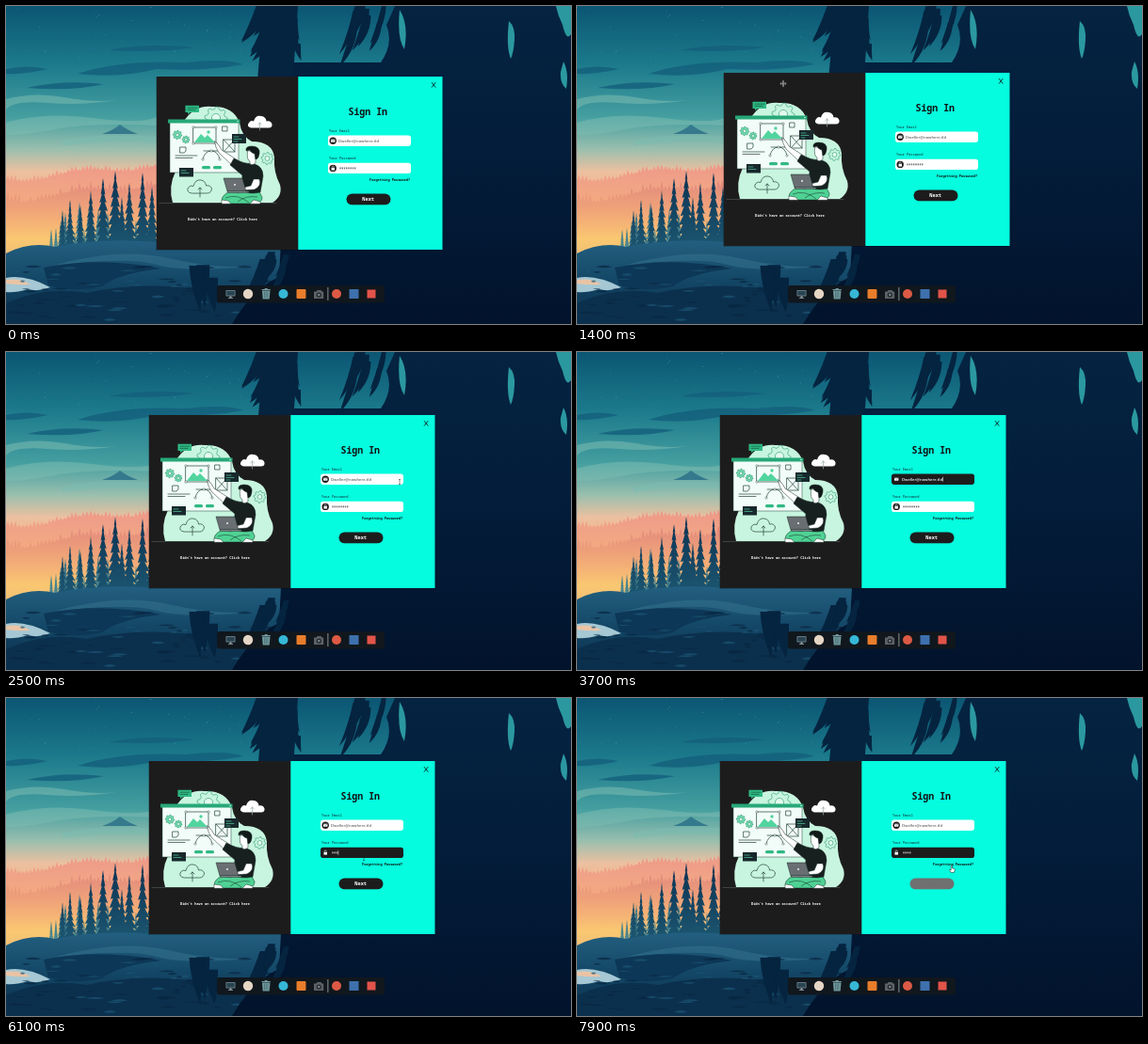
These frames come from a looping animation (600x338 px, 8 s). An HTML page:

```html
<!DOCTYPE html>
<html lang="en">
<head>
<meta charset="utf-8">
<title>Sign In</title>
<style>
html, body { margin: 0; width: 100%; height: 100%; overflow: hidden; background: #031a36; }
svg { display: block; width: 100vw; height: 100vh; }
text { font-family: "Noto Sans Mono", "DejaVu Sans Mono", monospace; font-weight: 600; white-space: pre; }
.plain { font-family: "Open Sans", sans-serif; }
.label { font-weight: 500; }
.line { fill: none; stroke: #24443c; stroke-width: .7; stroke-linecap: round; stroke-linejoin: round; }
.cursor > g { opacity: 0; }
</style>
</head>
<body>
<svg viewBox="0 0 600 338" preserveAspectRatio="none">
  <defs>
    <linearGradient id="sky" x2="0" y2="1">
      <stop offset="0" stop-color="#0b5673"/>
      <stop offset=".18" stop-color="#1b798b"/>
      <stop offset=".35" stop-color="#459fa0"/>
      <stop offset=".45" stop-color="#9abfae"/>
      <stop offset=".52" stop-color="#ecc0a0"/>
      <stop offset=".63" stop-color="#f7b07c"/>
      <stop offset=".73" stop-color="#fbd070"/>
      <stop offset=".8" stop-color="#eab578"/>
    </linearGradient>
    <linearGradient id="ridge" x2="0" y2="1">
      <stop stop-color="#ee9286"/><stop offset="1" stop-color="#f9ae75" stop-opacity="0"/>
    </linearGradient>
    <linearGradient id="near" x2="0" y2="1">
      <stop stop-color="#dd7d7c"/><stop offset="1" stop-color="#fbc56f" stop-opacity="0"/>
    </linearGradient>
    <linearGradient id="mist" gradientUnits="userSpaceOnUse" x1="0" y1="190" x2="0" y2="258">
      <stop stop-color="#2c6179"/><stop offset="1" stop-color="#4d8890"/>
    </linearGradient>
    <linearGradient id="pine" gradientUnits="userSpaceOnUse" x1="0" y1="180" x2="0" y2="262">
      <stop stop-color="#0d3453"/><stop offset="1" stop-color="#1d5873"/>
    </linearGradient>
    <linearGradient id="valley" x2="0" y2="1">
      <stop stop-color="#235f80"/><stop offset=".5" stop-color="#134665"/><stop offset="1" stop-color="#0a2d49"/>
    </linearGradient>
    <linearGradient id="night" x2="0" y2="1">
      <stop stop-color="#052442"/><stop offset=".5" stop-color="#031c39"/><stop offset="1" stop-color="#02132c"/>
    </linearGradient>
  </defs>

  <g id="scene">
    <path fill="url(#sky)" d="M0 0H600V338H0z"/>
    <g fill="#7cbcb2" opacity=".55">
      <path d="M0 99Q30 91 62 97T118 100Q80 106 44 103T0 110zM0 124Q40 112 92 119T160 118V127Q90 124 52 131T0 137z"/>
      <path d="M60 143Q100 134 160 139V146Q110 142 60 149z"/>
    </g>
    <g fill="#145f7c" opacity=".8">
      <path d="M0 67Q22 62 44 67Q20 73 0 72zM76 72Q120 57 190 60Q235 55 252 62Q210 70 160 67Q120 77 76 72z"/>
      <path d="M22 87Q60 78 104 83Q70 91 22 87zM110 47Q145 39 200 44Q160 50 110 47z"/>
    </g>
    <path fill="#35798d" d="M102 136Q114 132 121 126Q129 132 140 136z"/>
    <g id="stars" fill="#9ad5d5"></g>
    <g id="ridges"></g>
    <g id="forest"></g>
    <path fill="url(#valley)" d="M0 263Q25 250 52 256Q100 246 160 251H330V338H0z"/>
    <path fill="#37768f" opacity=".5" d="M50 276Q120 256 172 268T270 276Q190 284 160 275T50 276z"/>
    <path fill="#0d3756" d="M40 278Q100 266 165 279Q120 284 102 298Q70 305 45 297z"/>
    <path fill="#a5c8d4" d="M0 289Q20 285 47 299Q35 304 23 301Q10 305 0 304z"/>
    <path fill="#e9c3a5" d="M0 291Q15 289 26 296Q12 297 0 295z"/>
    <path fill="#0b304d" d="M0 316Q40 297 86 305Q150 290 232 305H330V338H0z"/>
    <g id="grass"></g>
    <path fill="url(#night)" d="M413 0H600V338H240Q262 300 290 288L302 60H398Q412 40 404 20z"/>
    <g id="boughs" fill="#052440"></g>
    <g fill="#2b98a0">
      <path d="M534 16Q541 22 540 36T536 56Q531 44 534 16zM584 0H600V30Q595 38 591 20Q586 10 584 0z"/>
      <path d="M592 59Q598 70 595 88Q588 82 589 70zM418 4Q428 20 423 46Q415 34 418 4z"/>
    </g>
  </g>

  <g id="dock">
    <rect x="224" y="297" width="178" height="18.500" rx="2.500" fill="#10171d"/>
    <rect x="233.500" y="302" width="10" height="6.500" rx=".7" fill="#6e8793"/>
    <path fill="#29434f" d="M234.300 302.800h8.400v4.800h-8.400z"/>
    <path fill="#a4adb2" d="M237.500 308.500h2v1.500h1.500v.8h-5v-.8h1.500z"/>
    <circle cx="257" cy="306" r="5.200" fill="#e5d5c4"/>
    <path fill="#739b9f" d="M272 302.500h8.500l-.8 9h-7zM271.500 301h9.300v1h-9.300zM274.700 300h3v1h-3z"/>
    <path class="line" style="stroke:#3f686e" d="M274.500 304v6M276.200 304v6M278 304v6"/>
    <circle cx="294.500" cy="306" r="5" fill="#36b7d6"/>
    <rect x="308.500" y="301" width="10" height="10" rx="1" fill="#e87d2b"/>
    <path fill="#5c6266" d="M327 303.500h2.500l1-1.500h4l1 1.500h1.700v7.500H327z"/>
    <circle cx="332.300" cy="307" r="2.600" fill="#20272b"/><circle cx="332.300" cy="307" r="1.300" fill="#75868e"/>
    <path fill="#a9b0b4" d="M341.500 299h.8v14h-.8z"/>
    <circle cx="351" cy="306" r="5" fill="#dc5a45"/>
    <rect x="364.500" y="301" width="10" height="10" fill="#3e70ad"/>
    <rect x="383.500" y="301.500" width="9" height="9" fill="#e2544a"/>
  </g>

  <g id="window">
    <path fill="#000" opacity=".2" d="M159 75H464V260H159z"/>
    <path fill="#1d1c1d" d="M160 75H310.500V259H160z"/>
    <path fill="#06fcde" d="M310.300 75H463.500V259H310.300z"/>

    <g id="art">
      <path fill="#c8f5df" d="M177 209Q172 192 180 176L188 124Q199 105 219 107Q241 106 248 124Q250 138 261 144Q283 144 285 161Q284 177 291 190Q294 202 283 209z"/>
      <g id="gears"></g>
      <rect x="174" y="123" width="73" height="54" fill="#f2fcf8" stroke="#24443c" stroke-width=".5"/>
      <rect x="172" y="120.500" width="76.500" height="4" fill="#27a878"/>
      <circle cx="246" cy="122.500" r=".8" fill="#c8f5df"/>
      <g id="panelGears"></g>
      <g class="line" stroke-width=".5">
        <path d="M199 129h24v17h-24zM231 142h12v13h-12zl12 13M243 142l-12 13M185 150h6v4l-2 2h-4zM230 128h5v5h-5z"/>
        <path d="M180 159h23M180 161.500h18M209 163Q211 154 218 154T227 163M210 154h16"/>
      </g>
      <path fill="#51d49e" d="M200 145l7-9 4 4 3-3 8 8z"/><circle cx="215" cy="134" r="1.700" fill="#51d49e"/>
      <path fill="#fff" stroke="#24443c" stroke-width=".4" d="M198 128h2v2h-2zM222 128h2v2h-2zM198 145h2v2h-2zM222 145h2v2h-2zM208 162h2v2h-2zM226 162h2v2h-2zM217 153h2v2h-2z"/>
      <rect x="208" y="170" width="9" height="3.200" rx="1.500" fill="#2fb983"/>
      <rect x="220" y="170" width="9" height="3.200" rx="1.500" fill="#2fb983"/>
      <path fill="#2fb983" d="M190.500 105.700h14.500v7.300h-9l-3 2v-2h-2.500z"/>
      <path class="line" style="stroke:#125840" d="M193 108.200h10M193 110.400h8"/>
      <path fill="#17282c" d="M240 136h15v10h-15zM184 172h15v9.500h-15z"/>
      <path class="line" style="stroke:#55cba0" d="M242 139h5M242 141.500h8M242 144h4M186 175h5M186 177.500h8"/>
      <path fill="#fff" d="M260 129.500Q255 128 258 124Q260 121 263 122.500Q265 115.500 271 117Q276 117.500 276.500 122.500Q281 121.500 282.500 125.500Q283 129.500 279 129.500z"/>
      <path class="line" style="stroke:#98a8a4" d="M269.500 132v-8M267.500 126l2-2 2 2"/>
      <path class="line" d="M197 199Q191 198 193.500 193Q196 190 199 191.500Q201 184 207 185Q212 186 212.500 191Q217 190 218.500 194Q218 199 214 199zM206 203v-10M204 195l2-2 2 2"/>
      <path class="line" style="stroke:#4a5552" d="M163 209.500h124"/>
      <g stroke="#152824" stroke-width=".5" stroke-linejoin="round">
        <path fill="#4fd294" d="M247 196Q268 190 272 203Q273 210 260 210H235Q227 209 230 203Q236 194 247 199z"/>
        <path fill="none" d="M233 204Q246 199 258 209M267 203Q255 201 246 208"/>
        <path fill="#fff" d="M229 206l7 1 3 3.300h-10zM263 206l7 2v2.300h-11z"/>
        <path fill="#fff" d="M246 164L229 153 226 148 221.500 143.500 223 150 226 156 242 171z"/>
        <path fill="#17201f" d="M242 162Q253 168 261 167.500Q273 169 273 181L270 198Q256 201 250 195L251 180 238 169z"/>
        <path fill="#fff" d="M269 184Q272 191 264 195L252 196 252 193 260 191 263 184z"/>
        <path fill="#fff" d="M256.500 154Q255.500 164 259 165V168Q262 170 265 167V161L266 154z"/>
        <path fill="#111918" d="M255 154Q254 149 261 149Q270 149 269 157Q268 163 265 163L264 157Q260 156 259 153Z"/>
        <path fill="#696e72" d="M231 183h20l4 14h-20z"/><path fill="#9a9fa2" d="M235 197h23v1.500h-22z"/>
      </g>
      <circle cx="243" cy="190" r="1" fill="#e8efed"/>
    </g>

    <g id="form" transform="translate(0 -.4)">
      <text x="193" y="228" font-size="3.640" fill="#fff">Didn't have an account? Click here</text>
      <path d="M452 81.500l4.300 5.500M456.300 81.500l-4.300 5.500" stroke="#111" stroke-width=".8"/>
      <text x="363.500" y="116.300" font-size="9.900" fill="#111">Sign In</text>
      <g fill="#123">
        <text class="label" x="343" y="134" font-size="3.650">Your Email</text>
        <text class="label" x="343" y="163.500" font-size="3.650">Your Password</text>
        <text x="386" y="186.500" font-size="3.600" fill="#111">Forgetting Password?</text>
      </g>
      <rect id="emailBox" x="342" y="138" width="88" height="11.300" rx="2.800" fill="#fff"/>
      <rect id="emailInput" x="353" y="141.300" width="73" height="4.700" fill="#1d1c1d" opacity="0"/>
      <circle cx="347.200" cy="143.600" r="3.700" fill="#1d1c1d"/>
      <path fill="#fff" d="M345 142.100h4.400v3H345z"/><path d="M345 142.300l2.200 1.500 2.200-1.500" fill="none" stroke="#1d1c1d" stroke-width=".4"/>
      <text id="email" class="plain" x="353" y="145.100" font-size="4.150" fill="#666">Dweller@nowhere.tld</text>
      <path id="emailCaret" fill="#fff" opacity="0" d="M396.300 141.200h.6v4.700h-.6z"/>
      <rect id="passBox" x="342" y="167.200" width="88" height="11.300" rx="2.800" fill="#fff"/>
      <circle cx="347.200" cy="172.800" r="3.700" fill="#1d1c1d"/>
      <path fill="#fff" d="M345.500 172.300h3.500v2.700h-3.500z"/><path d="M346.200 172.300v-1a1 1 0 0 1 2 0v1" fill="none" stroke="#fff" stroke-width=".5"/>
      <g id="dots" fill="#333"></g>
      <path id="passCaret" fill="#fff" opacity="0" d="M353.700 170.400h.6v4.800h-.6z"/>
      <rect id="button" x="361.500" y="199.800" width="47" height="12.200" rx="6.100" fill="#1d1c1d"/>
      <text id="next" x="378.300" y="207.900" font-size="5.300" fill="#fff">Next</text>
    </g>
  </g>

  <g class="cursor" id="cursor">
    <g id="arrow"><path d="M0 0v7l1.700-1.500 1.200 2.700 1.200-.5-1.200-2.600h2.300z" fill="#fff" stroke="#111" stroke-width=".5"/></g>
    <g id="move"><path d="M0-3.500l1.200 1.500h-2.400zM0 3.500l1.200-1.500h-2.400zM-3.500 0l1.500-1.200v2.400zM3.500 0l-1.500-1.200v2.400zM-.4-2h.8v1.600H2v.8H.4V2h-.8V.4H-2v-.8h1.600z" fill="#fff" stroke="#111" stroke-width=".2"/></g>
    <g id="beam"><path d="M-1-2.500h2M0-2.500v5M-1 2.500h2" stroke="#222" stroke-width=".5" fill="none"/></g>
    <g id="hand"><path d="M-.8-2.500q.7-.7 1.200 0V0l2.300.6q.8.4.5 1.500L2.400 4.500H-.6L-2.600 1.800q.2-.8 1-.4l.8.7z" fill="#fff" stroke="#111" stroke-width=".5"/></g>
  </g>
</svg>
<script>
const LOOP = 8000;
const DARK = '#1d1c1d';
const $ = id => document.getElementById(id);

let seed = 11;
const rand = (a = 0, b = 1) => {
  seed = (seed * 16807) % 2147483647;
  return a + (b - a) * seed / 2147483647;
};

function add(parent, tag, attrs) {
  const el = document.createElementNS('http://www.w3.org/2000/svg', tag);
  for (const key in attrs) el.setAttribute(key, attrs[key]);
  return $(parent).appendChild(el);
}

// Scenery
for (let i = 0; i < 45; i++) {
  add('stars', 'circle', { cx: rand(0, 250), cy: rand(0, 60), r: rand(.2, .5), opacity: rand(.3, .8) });
}

function ridge(fill, left, right, jag) {
  let d = 'M0 262';
  for (let x = 0; x <= 260; x += 4) {
    const y = left + (right - left) * Math.min(x / 160, 1) + 3 * Math.sin(x / 17);
    d += `L${x} ${y}L${x + 2} ${y - rand(2, jag)}`;
  }
  add('ridges', 'path', { d: d + 'L260 262z', fill });
}
ridge('url(#ridge)', 186, 170, 7);
ridge('url(#near)', 208, 190, 10);

function pine(x, base, height, fill) {
  const width = height * .13, tiers = 9;
  let left = '', right = '';
  for (let i = 1; i <= tiers; i++) {
    const y = base - height + height * i / tiers;
    const w = width * i / tiers * rand(.8, 1.2);
    right += `L${x + w} ${y}L${x + w * .45} ${y - 1}`;
    left = `L${x - w * .45} ${y - 1}L${x - w} ${y}` + left;
  }
  add('forest', 'path', { d: `M${x} ${base - height}${right}${left}z`, fill });
}
for (let x = 48; x < 166; x += 5) pine(x, 260, rand(20, 52), 'url(#mist)');
[[60, 217], [68, 206], [79, 212], [90, 196], [103, 183], [116, 175], [123, 203], [131, 188], [145, 177], [155, 192]]
  .forEach(([x, top]) => pine(x, 262, 262 - top, 'url(#pine)'));

for (let i = 0; i < 70; i++) {
  const x = rand(0, 280), y = rand(275, 335), length = rand(5, 22);
  add('grass', 'path', {
    d: `M${x} ${y}q${length / 2} ${rand(-4, 0)} ${length} 0q${-length / 2} 2 ${-length} 0z`,
    fill: i % 3 ? '#082742' : '#1c5675', opacity: .7
  });
}

function blade(x, y, length, width, lean = -.4) {
  const tipX = x + length * lean, tipY = y + length;
  add('boughs', 'path', {
    d: `M${x - width} ${y}Q${x - width + length * lean * .3} ${y + length * .5} ${tipX} ${tipY}Q${x + width} ${y + length * .6} ${x + width} ${y}z`
  });
}
add('boughs', 'path', { d: 'M274 0H310L304 90H266z' });
for (let i = 0; i < 16; i++) blade(rand(272, 300), rand(-8, 35), rand(25, 45), rand(3, 6), -.55);
for (let i = 0; i < 6; i++) blade(rand(300, 310), rand(-5, 40), rand(15, 28), 4, .25);
for (let i = 0; i < 9; i++) blade(rand(370, 412), rand(-8, 22), rand(25, 48), rand(1.5, 4), -.35);
for (let i = 0; i < 8; i++) blade(rand(265, 300), rand(255, 280), rand(22, 45), rand(2, 5), -.5);
for (let i = 0; i < 5; i++) blade(rand(195, 235), rand(275, 290), rand(30, 50), 7, .1);

// Illustration gears
function gear(parent, cx, cy, r, fill = 'none') {
  let d = '';
  for (let i = 0; i < 32; i++) {
    const a = i * Math.PI / 16, radius = i % 4 < 2 ? r : r * .78;
    d += `${i ? 'L' : 'M'}${cx + radius * Math.cos(a)} ${cy + radius * Math.sin(a)}`;
  }
  add(parent, 'path', { d: d + 'z', fill, stroke: '#2b9872', 'stroke-width': .6 });
  add(parent, 'circle', { cx, cy, r: r * .38, fill: '#e4faef', stroke: '#2b9872', 'stroke-width': .6 });
}
gear('gears', 223, 119, 12);
gear('gears', 277.500, 162, 6.500);
gear('panelGears', 182, 137, 4.800, '#75dbb0');
gear('panelGears', 191, 142, 4, '#75dbb0');

// Motion: rows of [time, value]; holds change at once
function play(el, prop, rows, hold = false) {
  const all = [[0, rows[0][1]], ...rows, [LOOP, rows.at(-1)[1]]];
  el.animate(all.map(([time, value]) => ({
    offset: time / LOOP, [prop]: value, easing: hold ? 'step-end' : 'linear'
  })), { duration: LOOP, iterations: Infinity });
}
const at = (x, y) => `translate(${x}px, ${y}px)`;
const show = (id, ...rows) => play($(id), 'opacity', rows, true);

play($('window'), 'transform', [[1150, at(0, 0)], [1400, at(-4, -4)], [1650, at(-8, -8)]]);

play($('cursor'), 'transform', [
  [150, at(290, 40)], [900, at(223, 87)], [1150, at(223, 87)], [1400, at(219, 82.500)], [1650, at(215, 78)],
  [1800, at(214.500, 79)], [1900, at(222, 81)], [2500, at(418, 138)], [3900, at(418, 138)], [4000, at(389, 139)],
  [4200, at(380, 170)], [6250, at(380, 170)], [6600, at(386, 198)], [7500, at(402, 200)], [7850, at(398, 181)]
]);
show('arrow', [0, 0], [150, 1], [850, 0], [1780, 1], [2450, 0], [6350, 1], [6550, 0]);
show('move', [0, 0], [850, 1], [1780, 0]);
show('beam', [0, 0], [2450, 1], [6350, 0]);
show('hand', [0, 0], [6550, 1]);

play($('emailBox'), 'fill', [[3050, '#fff'], [3300, DARK], [4600, DARK], [4690, '#fff']]);
play($('emailInput'), 'opacity', [[3050, 0], [3300, 1], [4700, 1], [4900, 0]]);
play($('email'), 'fill', [[3050, '#666'], [3300, '#fff'], [4700, '#fff'], [4900, '#666']]);
show('emailCaret', [0, 0], [3100, 1], [4600, 0]);

play($('passBox'), 'fill', [[4600, '#fff'], [4690, DARK]]);
const dotStep = 2.25;
for (let i = 0; i < 8; i++) {
  const dot = add('dots', 'circle', { cx: 355 + i * dotStep, cy: 172.800, r: .8 });
  const rows = [[0, 1], [5100 + (7 - i) * 65, 0]];
  if (i < 4) rows.push([5800 + i * 140, 1]);
  play(dot, 'opacity', rows, true);
}
play($('dots'), 'fill', [[4600, '#333'], [4690, '#fff']]);

const caretSteps = [[4600, at(8 * dotStep, 0)]];
for (let i = 7; i >= 0; i--) caretSteps.push([5100 + (7 - i) * 65, at(i * dotStep, 0)]);
for (let i = 0; i < 4; i++) caretSteps.push([5800 + i * 140, at((i + 1) * dotStep, 0)]);
play($('passCaret'), 'transform', caretSteps, true);
show('passCaret', [0, 0], [4600, 1], [6700, 0], [7200, 1], [7700, 0]);

const GREY = '#707070';
play($('button'), 'fill', [[6500, DARK], [6700, '#d0d0d0'], [7700, '#d0d0d0'], [7890, GREY]]);
play($('next'), 'fill', [[6500, '#fff'], [6700, DARK], [7700, DARK], [7890, GREY]]);
</script>
</body>
</html>
```
